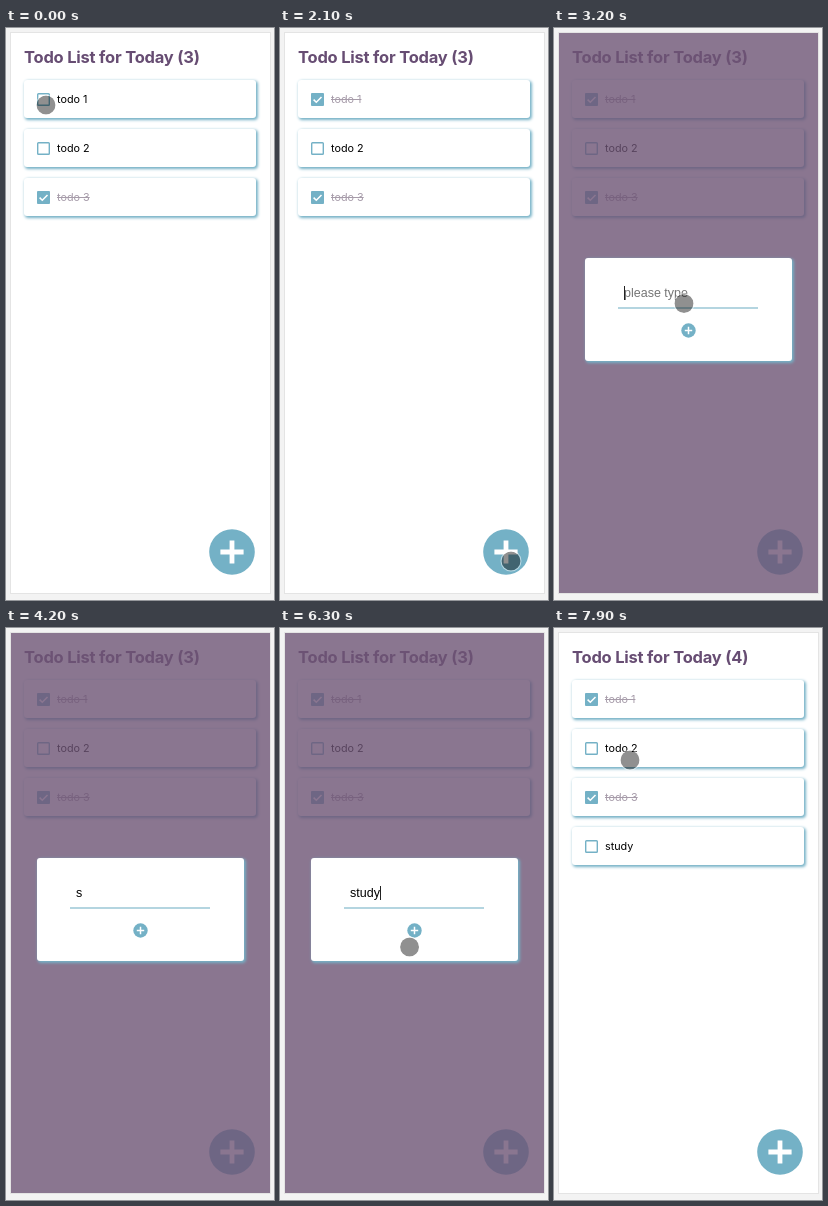
An HTML page for the animation above (8000 ms loop, 268 by 572 pixels).

```html
<!DOCTYPE html>
<html lang="en">
<head>
<meta charset="utf-8">
<title>Todo list</title>
<style>
  :root { --teal: #74b1c6; --plum: #674d73; }
  html, body { margin: 0; width: 100%; height: 100%; overflow: hidden; background: #f3f3f3; }
  #stage { position: relative; width: 268px; height: 572px; overflow: hidden; }
  #stage div, #stage h1, #stage svg { position: absolute; margin: 0; box-sizing: border-box; }
  .panel { left: 4px; top: 4px; width: 260.5px; height: 562px; background: #fff; border: 1px solid #e4e4e4; }
  #stage h1 { left: 18px; top: 19px; font: 700 16.5px/20px Inter, sans-serif; letter-spacing: -.22px; color: var(--plum); white-space: nowrap; }
  .card, .modal { background: #fff; border-radius: 3px; box-shadow: 1.3px 1.3px 3px .6px var(--teal); }
  .card { left: 18px; width: 232px; height: 38px; }
  .card span { position: absolute; left: 33px; top: 11.5px; font: 400 10.8px/16px Inter, sans-serif; color: #000; white-space: nowrap; }
  .card svg { left: 12px; top: 12px; }
  .tick { display: none; }
  .done .tick { display: inline; }
  .done span { color: #a79caa; text-decoration: line-through; }
  .shade { left: 5px; top: 5px; width: 259px; height: 560px; background: rgba(109, 84, 117, .8); }
  .modal { left: 31px; top: 230px; width: 207px; height: 103px; }
  .line { left: 33px; top: 49px; width: 140px; height: 1.5px; background: #b4d5e0; }
  #field { left: 39px; top: 27px; font: 400 12.5px/16px "Liberation Sans", Arial, sans-serif; white-space: pre; color: #000; }
  #field.empty { color: #757575; }
  #caret { top: 28px; width: 1px; height: 14px; background: #222; }
  #pointer { left: -10.5px; top: -10.5px; width: 21px; height: 21px; border-radius: 50%; background: rgba(0, 0, 0, .435); background-clip: padding-box; border: 1px solid rgba(255, 255, 255, .5); }
</style>
</head>
<body>
<div id="stage">
  <div class="panel"></div>
  <h1>Todo List for Today (<span id="count">3</span>)</h1>
  <div id="list"></div>
  <svg style="left:203px;top:501px" width="46" height="46" viewBox="-23 -23 46 46">
    <circle r="22.8" fill="#74b1c6"/>
    <path d="M-11.6 0H11.6M0-11.6V11.6" stroke="#fff" stroke-width="4.8"/>
  </svg>
  <div id="dialog">
    <div class="shade"></div>
    <div class="modal">
      <div id="field"></div>
      <div id="caret"></div>
      <div class="line"></div>
      <svg style="left:96px;top:64.5px" width="15" height="15" viewBox="-7.5 -7.5 15 15">
        <circle r="7.2" fill="#74b1c6"/>
        <path d="M-3.7 0H3.7M0-3.7V3.7" stroke="#fff" stroke-width="1.5"/>
      </svg>
    </div>
  </div>
  <div id="pointer"></div>
</div>
<script>
const LOOP = 8000, STEP = 100;
const CHECK = 300, OPEN = 2200, ADD = 6500, WAKE = 5600;
const KEYS = [3700, 4600, 4800, 5100, 5200], WORD = "study";
const HOME = { x: 39.5, y: 76.5 };
const $ = id => document.getElementById(id);

// pointer strokes: sideways bow in px
const strokes = [
  { from: 300, to: 1100, x: 230.5, y: 446.5, bow: 12 },
  { from: 1100, to: 1600, x: 198, y: 547, bow: 25 },
  { from: 1600, to: 2100, x: 230.5, y: 532.5, bow: 0 },
  { from: 2100, to: 3000, x: 129.5, y: 275, bow: 0 },
  { from: 5500, to: 6000, x: 94, y: 330, bow: 0 },
  { from: 6000, to: 6500, x: 132.5, y: 303.5, bow: -15 },
  { from: 6500, to: 7000, x: 85.5, y: 211, bow: 0 },
  { from: 7000, to: 7900, x: 75.5, y: 131.5, bow: 0 }
];

const easeOut = p => 1 - (1 - p) ** 1.55;

function pointAt(t) {
  let { x, y } = HOME;
  for (const s of strokes) {
    if (t <= s.from) break;
    const k = easeOut(Math.min(1, (t - s.from) / (s.to - s.from)));
    const dx = s.x - x, dy = s.y - y;
    const side = s.bow * Math.sin(Math.PI * k) / Math.hypot(dx, dy);
    x += dx * k + dy * side;
    y += dy * k - dx * side;
  }
  return [x, y];
}

const cards = ["todo 1", "todo 2", "todo 3", WORD].map((label, i) => {
  const card = document.createElement("div");
  card.className = "card";
  card.style.top = 52 + 49 * i + "px";
  card.innerHTML = `<svg width="15" height="15">
    <rect x="1.7" y="1.7" width="11.6" height="11.6" rx=".8" fill="none" stroke="#74b1c6" stroke-width="1.4"/>
    <g class="tick"><rect x="1" y="1" width="13" height="13" rx="1.4" fill="#74b1c6"/>
    <path d="M3.6 7.6L6.3 10.3L11.5 5" fill="none" stroke="#fff" stroke-width="1.5"/></g></svg>
    <span>${label}</span>`;
  $("list").before(card);
  return card;
});
cards[2].classList.add("done");

const pen = document.createElement("canvas").getContext("2d");
pen.font = '12.5px "Liberation Sans", Arial, sans-serif';

function drawDialog(t) {
  const typed = KEYS.filter(key => key <= t);
  const text = WORD.slice(0, typed.length);
  $("field").textContent = text || "please type";
  $("field").className = text ? "" : "empty";
  $("caret").style.left = 39 + pen.measureText(text).width + "px";

  // the blink restarts with every key
  const since = t - Math.max(OPEN, ...typed);
  $("caret").style.opacity = since % 1000 < 500 ? 1 : 0;
}

function draw(time) {
  const t = Math.floor(time / STEP) * STEP;
  const added = t >= ADD;
  cards[0].classList.toggle("done", t >= CHECK);
  cards[3].style.display = added ? "" : "none";
  $("count").textContent = added ? 4 : 3;
  $("dialog").style.display = t >= OPEN && !added ? "" : "none";
  drawDialog(t);

  const [x, y] = pointAt(t);
  $("pointer").style.transform = `translate(${x}px, ${y}px)`;
  $("pointer").style.opacity = t >= KEYS[0] && t < WAKE ? 0 : 1;
}

const start = performance.now();
function tick() {
  draw((performance.now() - start) % LOOP);
  requestAnimationFrame(tick);
}
draw(0);
requestAnimationFrame(tick);
</script>
</body>
</html>
```
